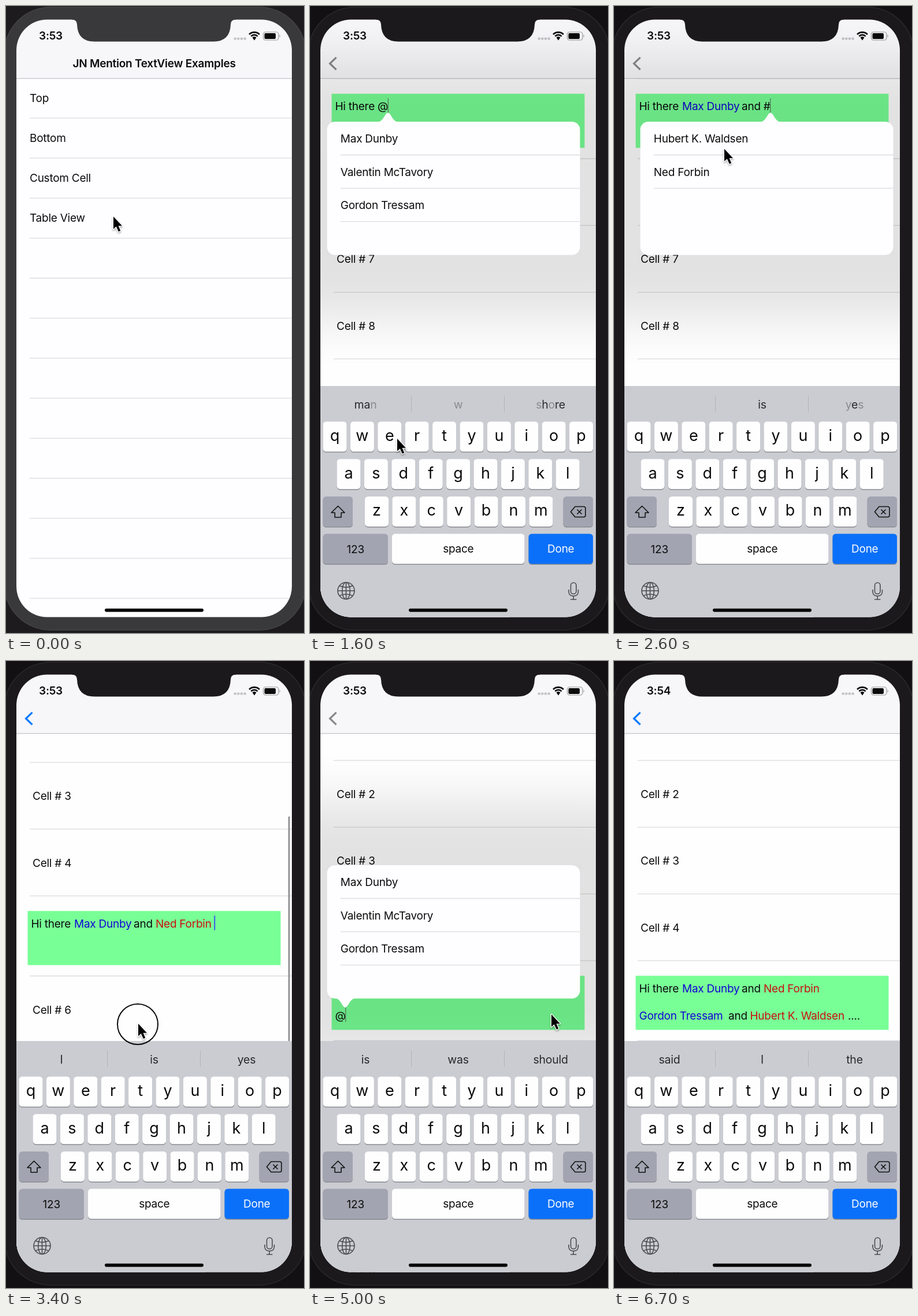
Recreate the animation shown at these times as an HTML page. Size 516 by 1084 pixels, loop 6.8 s.

```html
<!DOCTYPE html>
<html lang="en">
<head>
<meta charset="utf-8">
<title>Mention text view</title>
<style>
html, body { margin: 0; width: 100%; height: 100%; overflow: hidden; background: #121013; }
svg { display: block; width: 100%; height: 100%; }
text { font: 400 19px Inter, "Liberation Sans", sans-serif; letter-spacing: -0.25px; white-space: pre; fill: #0b0b0c; }
.bold { font-weight: 600; }
.mid { text-anchor: middle; }
.key { font-size: 27px; letter-spacing: 0; }
.key.cap { font-size: 25px; }
.hint { font-size: 19.5px; fill: #29292c; }
.sep { stroke: #dcdbdf; stroke-width: 1.3; }
.icon { fill: none; stroke: #4b4c51; stroke-width: 1.6; }
</style>
</head>
<body>
<svg id="stage" viewBox="0 0 516 1084" xmlns="http://www.w3.org/2000/svg"></svg>
<script>
const LOOP = 6800, STEP = 100;
const BLUE = '#1004d6', RED = '#c8100d';
const FRIENDS = ['Max Dunby', 'Valentin McTavory', 'Gordon Tressam'];
const OTHERS = ['Hubert K. Waldsen', 'Ned Forbin'];

// Motion keys: [step, value...]
const SCROLL = [[7, 0], [8, 30], [9, 64], [10, 69], [14, 69], [15, 330], [16, 461.5], [20, 461.5],
  [21, 69], [24, 69], [25, 400], [26, 461.5], [28, 461.5], [29, 180], [30, 69], [32, 69],
  [34, 181], [35, 300], [36, 340], [37, 290], [38, 180], [39, 90], [40, 69]];
const BOARD = [[7, 400], [8, 234], [9, 30], [10, 0]];
const PUSH = [[1, 0], [2, 0.55], [3, 0.92], [4, 1]];
const MOUSE = [[5, 186, 364], [6, 175, 560], [7, 155, 690], [8, 151, 748], [16, 151, 748],
  [18, 105, 330], [19, 95, 228], [21, 95, 228], [24, 160, 240], [26, 191, 247], [28, 120, 284],
  [30, 130, 300], [32, 228, 600], [33, 229, 660], [34, 229, 627], [36, 229, 468], [38, 229, 628],
  [39, 240, 650], [42, 418, 611], [50, 418, 611], [53, 120, 495], [55, 120, 495], [59, 180, 388]];

// Typing: [step, text]
const FIRST = [[0, ''], [10, 'Hi'], [11, 'Hi th'], [12, 'Hi there'], [13, 'Hi there '], [14, 'Hi there @'], [20, 'Hi there ']];
const JOIN1 = [[0, ''], [22, 'an'], [23, 'and '], [24, 'and #'], [29, 'and ']];
const THIRD = [[0, ''], [48, '@'], [54, FRIENDS[2] + ' ']];
const JOIN2 = [[0, ''], [55, 'an'], [56, 'and '], [57, 'and #'], [61, 'and ']];
const DOTS = [[0, ''], [63, '.'], [64, '..'], [65, '...'], [66, '....']];
// A tilde makes the next letter faint.
const HINTS = [[0, 'Hi', 'Hi there', 'There'], [12, 'there', 'there’s', 'therefore'], [13, 'is', 'was', 'should'],
  [16, 'ma~n', '~w', '~sh~ore'], [17, 'man', 'way', 'shore'], [20, 'is', 'was', 'and'], [23, 'I', 'the', 'then'],
  [26, '', 'is', '~ye~s'], [27, 'I', 'is', 'yes'], [44, 'I', 'The', 'I’m'], [48, 'is', 'was', 'should'],
  [54, 'is', 'was', 'and'], [56, 'I', 'the', 'then'], [58, 'is', 'was', 'yes'], [61, 'is', 'and', 'said'], [63, 'said', 'I', 'the']];
// Popovers: first step, end step, tip x, edge y, arrow side, names
const POPS = [[15, 20, 135, 200, 1, FRIENDS], [25, 29, 271, 200, 1, OTHERS],
  [49, 54, 61, 353, -1, FRIENDS], [58, 61, 247, 353, -1, OTHERS]];

function at(keys, k) {
  const n = keys.findIndex(e => e[0] >= k);
  if (n < 0) return keys[keys.length - 1].slice(1);
  if (n === 0) return keys[0].slice(1);
  const a = keys[n - 1], b = keys[n], p = (k - a[0]) / (b[0] - a[0]);
  return a.slice(1).map((v, i) => v + (b[i + 1] - v) * p);
}
const pick = (list, k) => list.filter(e => e[0] <= k).pop();
const typed = (list, k) => pick(list, k)[1];

const rect = (x, y, w, h, fill, r = 0, more = '') =>
  `<rect x="${x}" y="${y}" width="${w}" height="${h}" rx="${r}" fill="${fill}" ${more}/>`;
const text = (x, y, s, cls = '', more = '') => `<text x="${x}" y="${y}" class="${cls}" ${more}>${s}</text>`;
const line = (x1, x2, y) => `<line class="sep" x1="${x1}" x2="${x2}" y1="${y}" y2="${y}"/>`;
const path = (d, more) => `<path d="${d}" ${more}/>`;

function menu() {
  let s = rect(18, 125, 477, 932, '#fefdff') + rect(18, 332.5, 477, 69, '#d9d8dc', 0, 'id="picked"');
  ['Top', 'Bottom', 'Custom Cell', 'Table View'].forEach((name, i) => s += text(41, 165.7 + 69.2 * i, name));
  for (let i = 0; i < 13; i++) s += line(41, 495, 193.7 + 69.2 * i);
  return s;
}

function cells() {
  let s = '';
  for (let n = 1; n <= 10; n++) {
    const top = 125.5 + 115.4 * (n - 1) + (n > 5 ? 23 : 0);
    if (n !== 5) s += text(46, top + 65, 'Cell # ' + n);
    s += line(41, 495, top + (n === 5 ? 138.4 : 115.4));
  }
  return s + rect(37.5, 613.2, 438, 93.5, '#78ff96') + '<g id="note"></g>' + rect(42, 0, 2, 25, '#3c5bea', 0, 'id="caret"');
}

function cap(x, y, w, fill, label, cls = 'key letter', dy = 7.5, ink = '') {
  return rect(x, y + 1.5, w, 52, '#898b91', 5.5) + rect(x, y, w, 52, fill, 5.5) +
    (label ? text(x + w / 2, y + 26 + dy, label, cls + ' mid', ink && `style="fill:${ink}"`) : '');
}

function keyboard() {
  const grey = '#a2a5b1';
  let s = rect(18, 657, 477, 402, '#cbccd2');
  for (const x of [175.5, 336.5]) s += rect(x - 0.5, 674, 1, 28, '#b2b3b9');
  for (const x of [96, 256.5, 416.5]) s += text(x, 695.5, '', 'hint mid');
  s += `<g id="ghost" fill-opacity=".55">${text(251, 695.5, 'i', 'hint mid')}${text(408, 695.5, 'y', 'hint mid')}</g>`;
  [['qwertyuiop', 22.5], ['asdfghjkl', 46.5], ['zxcvbnm', 95]].forEach(([row, x], r) => {
    [...row].forEach((c, i) => s += cap(x + 47.4 * i, 718.5 + 64.7 * r, 41, '#fefefe', c));
  });
  s += cap(22.5, 848, 51.5, grey) + cap(438.5, 848, 51.5, grey);
  s += cap(22.5, 912.5, 112.5, grey, '123', '', 7) + cap(142, 912.5, 229.5, '#fefefe', 'space', '', 6);
  s += cap(378.5, 912.5, 111.5, '#0b70f9', 'Done', '', 6, '#fff');
  s += path('M48.5 864.5 L60 876 H54 V884 H43 V876 H37 Z', 'id="shift" class="icon" style="stroke:#111;stroke-linejoin:round"');
  s += path('M459 865.5 H474 Q477 865.5 477 868.5 V880.5 Q477 883.5 474 883.5 H459 L451.5 874.5 Z M462.5 870.5 l8 8 m0 -8 l-8 8',
    'class="icon" style="stroke:#111;stroke-linejoin:round"');
  s += `<g class="icon"><circle cx="62.5" cy="1011" r="14.5"/><ellipse cx="62.5" cy="1011" rx="6.8" ry="14.5"/>` +
    path('M62.5 996.5 V1025.5 M48 1011 H77 M51.5 1002.5 Q62.5 1007.5 73.5 1002.5 M51.5 1019.5 Q62.5 1014.5 73.5 1019.5') +
    rect(451.5, 997, 9.5, 19.5, 'none', 4.75) + path('M448 1009 V1012 Q448 1020 456.2 1020 Q464.5 1020 464.5 1012 V1009 M456.2 1020 V1026 M451 1026 H461.5') + '</g>';
  return s;
}

function statusBar() {
  const arc = r => `M${430 - r * 0.72} ${57.8 - r * 0.7} A${r} ${r} 0 0 1 ${430 + r * 0.72} ${57.8 - r * 0.7}`;
  let s = text(77.5, 58.3, '', 'bold mid', 'id="clock"');
  for (let i = 0; i < 4; i++) s += `<circle cx="${396.7 + 5.6 * i}" cy="56.5" r="2.3" fill="#c3c2c6"/>`;
  for (const r of [7.8, 12.4]) s += path(arc(r), 'fill="none" stroke="#0b0b0c" stroke-width="2.7"');
  s += path(arc(4.8) + ' L430 59.5 Z', 'fill="#0b0b0c"');
  return s + rect(445.5, 45, 26.5, 14, 'none', 4, 'stroke="#9b9a9e" stroke-width="1.2"') +
    rect(447.5, 47, 19.5, 10, '#0b0b0c', 2) + path('M473.7 49.5 Q476 52 473.7 54.5 Z', 'fill="#9b9a9e"');
}

const stage = document.getElementById('stage');
stage.innerHTML = `
<defs>
  <clipPath id="screen"><rect x="18" y="23.5" width="477" height="1033" rx="53"/></clipPath>
  <filter id="soft" filterUnits="userSpaceOnUse" x="-300" y="-200" width="1100" height="1300"><feGaussianBlur stdDeviation="45"/></filter>
  <filter id="drop" x="-60%" y="-40%" width="220%" height="200%"><feDropShadow dx="0" dy="2" stdDeviation="1.4" flood-opacity=".35"/></filter>
</defs>
<rect id="back" width="516" height="1084"/>
<rect id="body" x="-3" y="2" width="522" height="1077" rx="80" stroke-width="1.5"/>
<g clip-path="url(#screen)">
  <g id="menu">${menu()}</g>
  <g id="page">${rect(18, 125, 477, 932, '#fefefe')}<g id="cells">${cells()}</g>
    ${rect(488.7, 0, 2.8, 520, '#8f8f93', 1.4, 'id="bar"')}</g>
  ${rect(18, 23, 477, 102, '#f7f6f8')}${rect(18, 124.8, 477, 1.2, '#c4c3c7')}
  ${text(256.5, 106.3, 'JN Mention TextView Examples', 'bold mid', 'id="title"')}
  <path id="chevron" d="M45.5 88.8 L34.5 99.5 L45.5 110.2" fill="none" stroke-width="3.2"/>
  ${statusBar()}
  <g id="pop"></g>
  <g id="board">${keyboard()}</g>
  ${rect(171, 1041.8, 171, 5.6, '#050505', 2.8)}
</g>
<path id="notch" d="M114 22 V23.5 Q123 23.5 123 32 Q124 61.5 153 61.5 H359 Q388 61.5 389 32 Q389 23.5 398 23.5 V22 Z"/>
<circle id="touch" r="35" fill="none" stroke="#0a0a0a" stroke-width="2"/>
<g id="mouse" filter="url(#drop)"><path d="M0 0 V21.5 L4.8 17.2 L8.8 26 L12.3 24.4 L8.6 15.9 H15 Z" fill="#050505" stroke="#fff" stroke-width="2.4" paint-order="stroke" stroke-linejoin="round"/></g>`;

const el = {};
stage.querySelectorAll('[id]').forEach(e => el[e.id] = e);
const hints = [...el.board.querySelectorAll('.hint')].slice(0, 3);
const letters = [...el.board.querySelectorAll('.letter')];
const set = (e, attrs) => { for (const a in attrs) e.setAttribute(a, attrs[a]); };
const show = (e, on) => set(e, { visibility: on ? 'visible' : 'hidden' });
const move = (e, x, y) => set(e, { transform: `translate(${x} ${y})` });

function drawNote(k, dim) {
  const y1 = 641.7, y3 = 688.5;
  const parts = [
    [43.5, y1, typed(FIRST, k)],
    [118, y1, k >= 20 ? FRIENDS[0] + ' ' : '', BLUE],
    [221, y1, typed(JOIN1, k)],
    [259, y1, k >= 29 ? OTHERS[1] + ' ' : '', RED],
    [43.5, y3, typed(THIRD, k), k >= 54 ? BLUE : ''],
    [198, y3, typed(JOIN2, k)],
    [235.5, y3, k >= 61 ? OTHERS[0] + ' ' : '', RED],
    [405, y3, typed(DOTS, k)]
  ].filter(p => p[2]);
  el.note.innerHTML = parts.map(([x, y, s, ink]) => text(x, y, s, '', ink ? `style="fill:${ink}"` : '')).join('');
  let x = 42, y = y1;
  const last = parts[parts.length - 1];
  if (last) {
    x = last[0] + el.note.lastChild.getComputedTextLength() - 0.5;
    y = last[1];
  }
  if (k >= 44 && k < 48) { x = 42; y = k < 45 ? 665 : y3; }
  set(el.caret, { x, y: y - 20.5, width: dim ? 1.2 : 2, fill: dim ? '#5d7a64' : '#3c5bea' });
  show(el.caret, k >= 8 && k < 66);
}

function drawPop(k) {
  const pop = POPS.find(p => k >= p[0] && k < p[1]);
  el.pop.innerHTML = '';
  if (!pop) return false;
  const [from, , tip, y, side, names] = pop;
  const x = Math.min(45.5, Math.max(29.5, tip - 219)), edge = side > 0 ? y + 0.5 : y + 230;
  let s = rect(x - 110, y - 110, 658, 450, '#000', 20, 'opacity=".11" filter="url(#soft)"');
  s += rect(x, y, 438, 230.5, '#fefdff', 14);
  s += path(`M${tip - 18} ${edge} C${tip - 8} ${edge} ${tip - 5} ${edge - side * 16} ${tip} ${edge - side * 16} S${tip + 8} ${edge} ${tip + 18} ${edge} Z`, 'fill="#fefdff"');
  names.forEach((name, i) => s += text(x + 23.3, y + 36 + 57.6 * i, name) + line(x + 23.3, x + 438, y + 57.5 + 57.6 * i));
  el.pop.innerHTML = s;
  set(el.pop, { opacity: k === from ? 0.6 : 1 });
  return true;
}

function render(ms) {
  const k = Math.floor((ms % LOOP) / STEP);
  const dark = k > 0, [push] = at(PUSH, k), [scroll] = at(SCROLL, k);
  const shell = dark ? '#1b191c' : '#39383a';
  set(el.back, { fill: dark ? '#121013' : '#1d1b1e' });
  set(el.body, { fill: shell, stroke: dark ? '#2b292c' : '#444345' });
  set(el.notch, { fill: shell });

  move(el.menu, -150 * push, 0);
  move(el.page, 477 * (1 - push), 0);
  show(el.picked, k > 0 && k < 4);
  move(el.title, -150 * push, 0);
  set(el.title, { opacity: 1 - push });
  move(el.cells, 0, -scroll);
  set(el.bar, { y: 124 + scroll * 0.8 });
  show(el.bar, k > 32 && k < 41);

  const dim = drawPop(k);
  set(el.chevron, { stroke: dim ? '#88888b' : '#0a7aff', opacity: push });
  drawNote(k, dim);
  el.clock.textContent = k < 52 ? '3:53' : '3:54';

  move(el.board, 0, at(BOARD, k)[0]);
  const upper = k < 10 || (k >= 44 && k < 48);
  letters.forEach(e => {
    const c = e.textContent;
    e.textContent = upper ? c.toUpperCase() : c.toLowerCase();
    e.classList.toggle('cap', upper);
    move(e, 0, upper ? 1.5 : 0);
  });
  el.shift.style.fill = upper ? '#111' : 'none';
  pick(HINTS, k).slice(1).forEach((s, i) =>
    hints[i].innerHTML = s.replace(/~(.)/g, '<tspan fill-opacity=".4">$1</tspan>'));
  show(el.ghost, k === 8);

  const [mx, my] = at(MOUSE, k);
  move(el.mouse, mx, my);
  show(el.mouse, k < 62);
  move(el.touch, mx - 1, my + 1);
  show(el.touch, k > 32 && k < 39);
}

function tick() {
  render(performance.now());
  requestAnimationFrame(tick);
}
tick();
</script>
</body>
</html>
```
